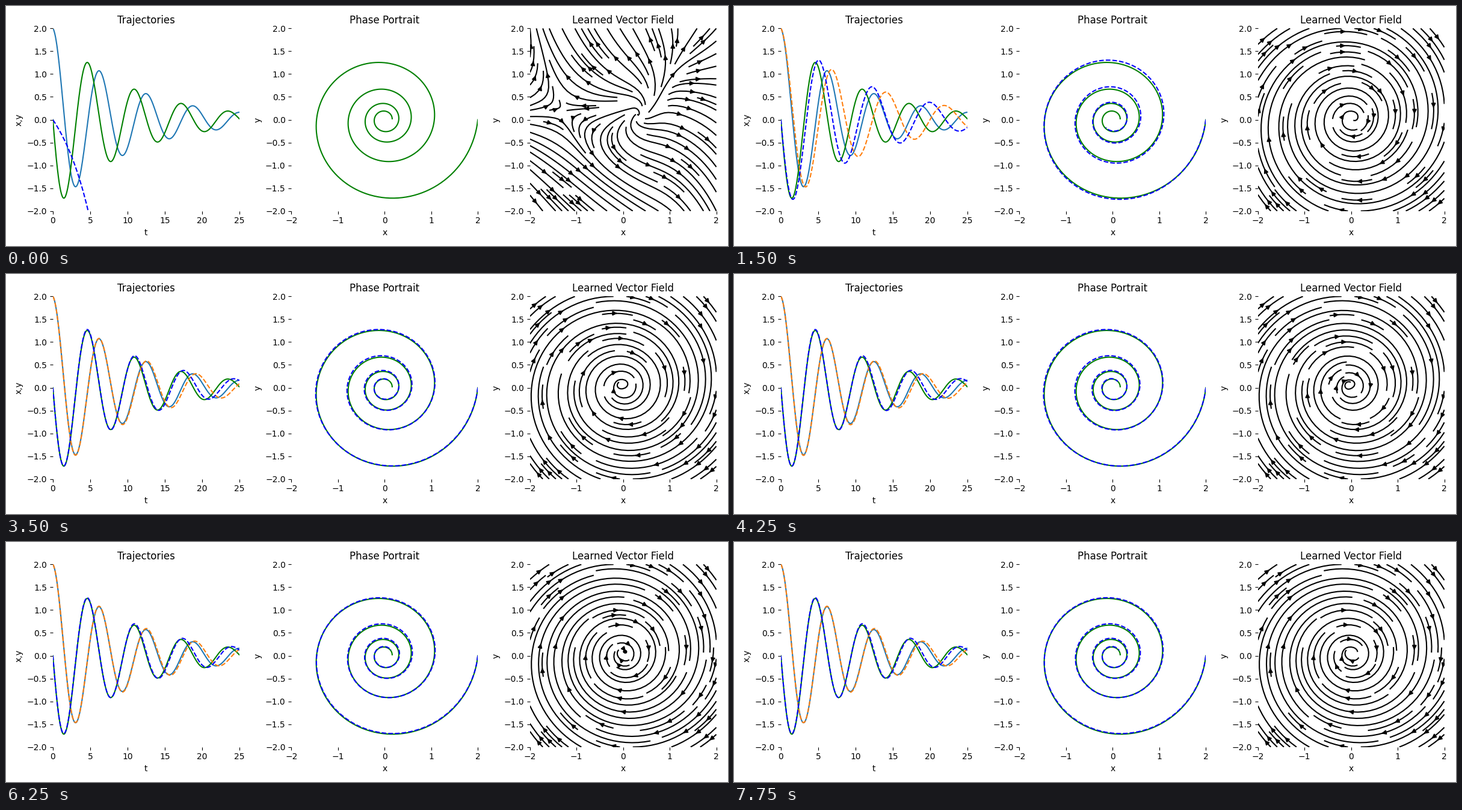
Animation, 1200 px wide and 400 px high, one loop 8 s. Source, as a matplotlib script:

```python
import numpy as np
import matplotlib.pyplot as plt
from matplotlib.animation import FuncAnimation

FRAMES = 32
WARMUP = 4  # steps until the random start has become a spiral
T = np.linspace(0, 25, 500)


def untrained(x, y):
    """Spiral source beside a saddle, built from its two nullclines."""
    x = np.clip(x, -2, 2)
    flat = .5 + .22 * x - .8 * np.exp(-((x - .7) / .4) ** 2)
    steep = .9 * (x + .45) ** 2 - .45
    u = 1.1 * np.tanh(.9 * (steep - y))
    v = y - flat
    gain = np.where(v > 0, 1.2, .3 + .12 * x ** 2 + .2 * np.exp(-v ** 2))
    return .3 * u, .3 * gain * v


def spiral(x, y, step):
    """Damped rotation whose errors fade as training goes on."""
    n = np.maximum(step - WARMUP, 0)
    error = np.exp(-n / 1.6)
    angle = np.radians(92 + 33 * np.cos(2 * np.pi * (step - 17) / 21))
    x, y = x - .012 * np.cos(angle), y - .012 * np.sin(angle)
    r = np.hypot(x, y)

    lag = .055 + .04 * error + .09 * n * np.exp(-n / 3)
    w = 1 - .306 * error - lag * np.exp(-(r / (.6 + .5 * error)) ** 2)
    dip = (.03 + .03 * error) * (r - .3) * np.exp(-(r / .8) ** 2)
    decay = .1 - .037 * error - dip
    tilt = .04 * error
    stretch = 1 + .07 * error
    return (-(decay + tilt) * x + w / stretch * y,
            -(decay - tilt) * y - w * stretch * x)


def field(x, y, step):
    mix = 1 - (1 - np.minimum(step / WARMUP, 1)) ** 2
    start, end = untrained(x, y), spiral(x, y, step)
    return np.array([(1 - mix) * s + mix * e for s, e in zip(start, end)])


def integrate():
    """Runge-Kutta paths from (2, 0), all training steps at once."""
    steps = np.arange(FRAMES)

    def rate(p):
        return field(p[0], p[1], steps)

    p = np.array([np.full(FRAMES, 2.0), np.zeros(FRAMES)])
    path, dt = [p], T[1] - T[0]
    for _ in T[1:]:
        k1 = rate(p)
        k2 = rate(p + dt / 2 * k1)
        k3 = rate(p + dt / 2 * k2)
        k4 = rate(p + dt * k3)
        p = p + dt / 6 * (k1 + 2 * k2 + 2 * k3 + k4)
        path.append(p)
    return np.array(path)


def panel(pos, title, xlabel, ylabel, xlim):
    ax = fig.add_subplot(1, 3, pos, frameon=False)
    ax.set(title=title, xlabel=xlabel, ylabel=ylabel, xlim=xlim, ylim=(-2, 2))
    return ax


fig = plt.figure(figsize=(12, 4), dpi=100, facecolor="white")
traj = panel(1, "Trajectories", "t", "x,y", (0, 25))
phase = panel(2, "Phase Portrait", "x", "y", (-2, 2))
vec = panel(3, "Learned Vector Field", "x", "y", (-2, 2))

envelope = 2 * np.exp(-.1 * T)
true_x, true_y = envelope * np.cos(T), -envelope * np.sin(T)
traj.plot(T, true_x, "C0-", T, true_y, "g-")
phase.plot(true_x, true_y, "g-")
line_x, line_y = traj.plot([], [], "C1--", [], [], "b--")
line_phase, = phase.plot([], [], "b--")
fig.tight_layout()

paths = integrate()
grid_y, grid_x = np.mgrid[-2:2:21j, -2:2:21j]


def update(i):
    px, py = paths[:, 0, i], paths[:, 1, i]
    line_x.set_data(T, px)
    line_y.set_data(T, py)
    line_phase.set_data(px, py)

    for art in [*vec.collections, *vec.patches]:
        art.remove()
    u, v = field(grid_x, grid_y, i)
    size = np.hypot(u, v)
    vec.streamplot(grid_x, grid_y, u / size, v / size, color="black")
    vec.set(xlim=(-2, 2), ylim=(-2, 2))


anim = FuncAnimation(fig, update, frames=FRAMES, interval=250, repeat=True)
plt.show()
```
